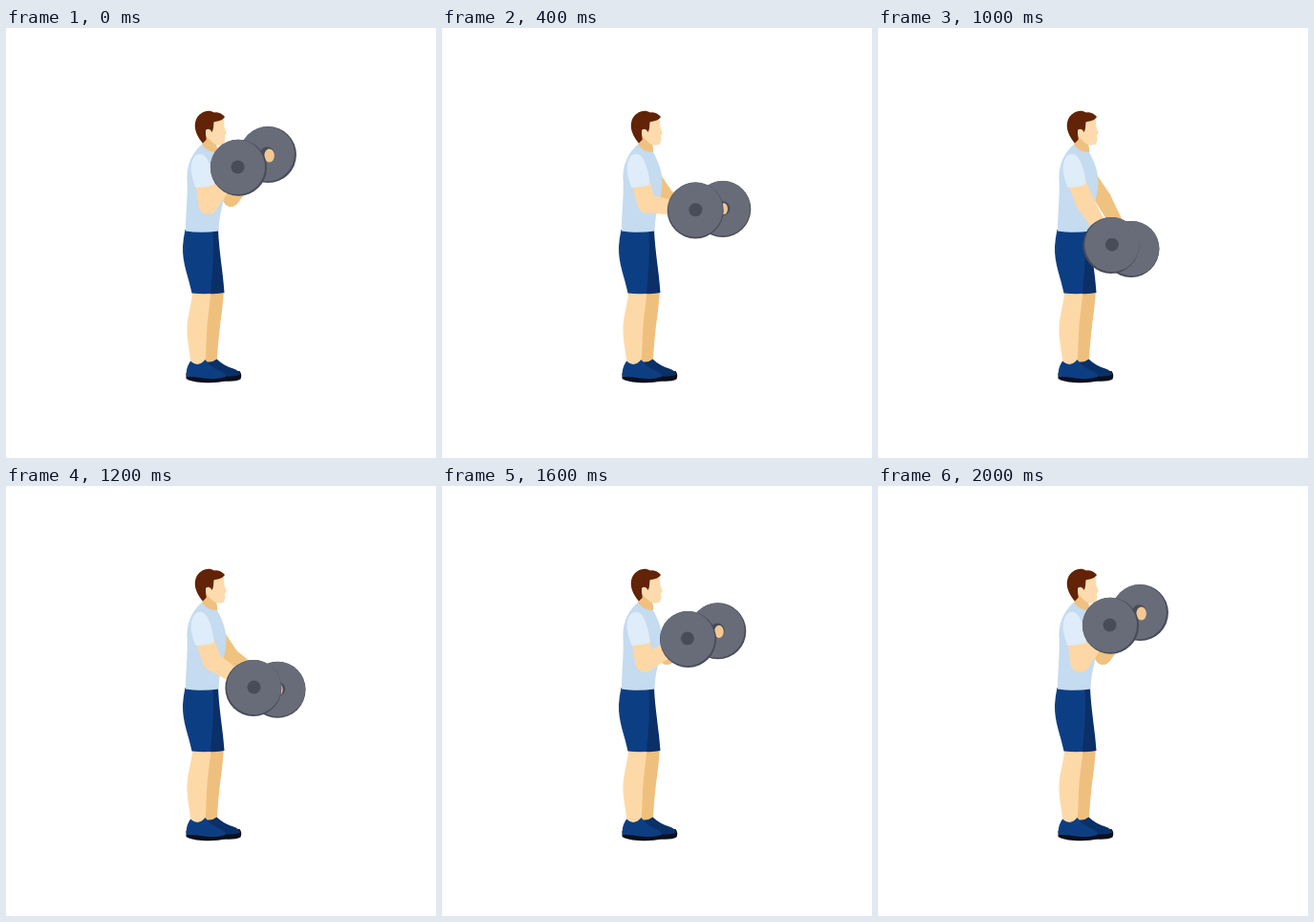
Write an HTML page that moves like this. It is 450 by 450 pixels and loops after 2.3 s.

```html
<!DOCTYPE html>
<html lang="en">
<head>
<meta charset="utf-8">
<title>Dumbbell curl</title>
<style>
  html, body { margin: 0; width: 100%; height: 100%; overflow: hidden; background: #fff; }
  svg { display: block; width: 100vw; height: 100vh; }
</style>
</head>
<body>
<svg viewBox="0 0 450 450">
  <path id="backUpper" fill="#f0c27f"/>
  <path id="backFore" fill="#f0c27f"/>

  <g id="legs">
    <path fill="#efc07d" d="M208 274 L227.800 274 C227 292 225 303 223.500 316 C222 329 221.500 340 220.500 351 L207 353 Z"/>
    <path fill="#fed9a8" d="M195.500 274 L214.500 274 C213.500 290 210.500 304 210 320 C209.500 333 209 343 208.500 353 L193.500 354 C193 340 189 328 189.500 313 C190 300 194.500 288 195.500 274 Z"/>
  </g>

  <g id="shoes">
    <path fill="#0c0f1c" d="M210 362 L244.500 359 Q247.500 363 245.500 367.500 Q240 370.500 228 369.500 L210 369 Z"/>
    <path fill="#0a3068" d="M208.500 349 Q215 351 220.500 346.500 Q228 353.500 238 356.500 Q245 359 245 363 Q236 366 225 364 L210 361 Z"/>
    <path fill="#0c0f1c" d="M188.500 361 L230 364 Q231.500 367 229.500 369.500 Q220 372 205 371 Q193 370 188.500 367 Z"/>
    <path fill="#0d3e82" d="M193 348.500 Q201 356 208.500 347 Q214 355 223 358.500 Q230 361 230 365 Q220 368.500 207 366.500 Q197 364.500 189 365 Q187.500 357 193 348.500 Z"/>
  </g>

  <g id="shorts">
    <path fill="#0a3067" d="M205 211 L222 211 C223 235 227 254 228.500 277 Q222 278.500 212 278 Z"/>
    <path fill="#0c3e84" d="M187.500 211 L216.500 211 C218 235 216 255 214 278 Q204 278.500 194.500 277.500 C191 260 184.500 247 185 229 Q185.500 220 187.500 211 Z"/>
  </g>

  <g id="head">
    <path fill="#efc180" d="M206 108 L219 116 L221 126 L221 133 L205 126 Z"/>
    <path fill="#fddbae" d="M210 98 L219 96 L228 96 L228.500 104 L230.800 110 L229 112.500 L229.500 117 L228 121.500 Q223 124 217.500 121 L209 113 Z"/>
    <path fill="#622306" d="M206 120.500 C200 114 196 105 198.500 97 C202 88 211 84.500 218 88.500 C223 87.500 226.500 90 229 93 C226 98 221 97 217.500 98.500 C217 102 217.500 106 215.500 109 C213 104 208.500 105 209 110 C209 114 210 115 209.500 117 Z"/>
    <path fill="#fddbae" d="M209 107 Q212 104.500 214.500 108.500 L214 114 Q209.500 113 209 107 Z"/>
  </g>

  <path id="shirt" fill="#c4dbf0" d="M205 122 Q212 131 221 130 C226 139 230 149 230.500 160 C230.500 178 223 190 222.500 212.500 Q204 215 188 212.500 C188 192 190.500 177 189.500 157 C189 142 196 129 205 122 Z"/>

  <path id="frontUpper" fill="#fdd7a5"/>
  <path id="frontFore" fill="#fdd7a5"/>
  <path id="sleeve" fill="#dfecf9" d="M198 133.500 Q205 129 210 136 C215 145 217 154 217.500 164 Q208 167.500 198.500 167 C194 156 190.500 142 198 133.500 Z"/>

  <g id="backDisc">
    <circle r="29.500" fill="#484b58"/>
    <g class="face">
      <circle r="28.600" fill="#686c78"/>
      <circle r="7.500" fill="#494c58"/>
      <ellipse id="hand" fill="#f3c894"/>
    </g>
  </g>
  <g id="frontDisc">
    <circle r="29.500" fill="#484b58"/>
    <g class="face">
      <circle r="28.600" fill="#686c78"/>
      <circle r="7" fill="#494c58"/>
    </g>
  </g>
</svg>
<script>
const LOOP = 2300, STEP = 100;
// Swing angle in degrees at each step, 0 = level, positive = down
const LOWER = [-56.6, -46, -33, -15, 4.7, 24, 43.8, 56, 68, 68];
const RAISE = [56, 44, 30, 15, 0, -17, -33, -41, -48, -53, -56.6, -56.6, -56.6];
const ANGLES = [...LOWER, ...RAISE];

const el = id => document.getElementById(id);
const rad = deg => deg * Math.PI / 180;
const polar = (x, y, r, deg) => [x + r * Math.cos(rad(deg)), y + r * Math.sin(rad(deg))];
const move = (node, x, y) =>
  node.setAttribute('transform', `translate(${x.toFixed(2)} ${y.toFixed(2)})`);

// Tapered limb with round ends
function limb(id, [x1, y1], r1, [x2, y2], r2) {
  const a = Math.atan2(y2 - y1, x2 - x1);
  const nx = -Math.sin(a), ny = Math.cos(a);
  const p = (x, y, r) => `${(x + nx * r).toFixed(2)} ${(y + ny * r).toFixed(2)}`;
  el(id).setAttribute('d',
    `M${p(x1, y1, r1)} L${p(x2, y2, r2)} A${r2} ${r2} 0 0 0 ${p(x2, y2, -r2)} ` +
    `L${p(x1, y1, -r1)} A${r1} ${r1} 0 0 0 ${p(x1, y1, r1)} Z`);
}

// The face sits off the rim's centre as the plate tilts
function placeDisc(id, [x, y], lean) {
  const disc = el(id);
  move(disc, x, y);
  move(disc.querySelector('.face'), 1.2 * lean, -0.8);
}

function draw(time) {
  const angle = ANGLES[Math.floor((time % LOOP) / STEP)];
  const front = polar(216.6, 187, 48.8, angle);
  const back = polar(233, 178.5, 61.8, angle * 0.95 + 5.8);
  const lean = Math.sin(rad(angle));
  const up = Math.max(0, -lean);

  const backElbow = [235.5, 178.5];
  const frontElbow = [214 + 3.2 * lean, 184 - 1.5 * lean];
  limb('backUpper', [224, 155], 5, backElbow, 8.5);
  limb('backFore', backElbow, 8.5, back, 5);
  limb('frontUpper', [207.5, 160], 9.5, frontElbow, 9.8);
  limb('frontFore', frontElbow, 9.8, front, 6);

  placeDisc('backDisc', back, lean);
  placeDisc('frontDisc', front, lean);

  const hand = el('hand');
  hand.setAttribute('cx', 1 + up * 1.5);
  hand.setAttribute('cy', 0.5 + up * 1.5);
  hand.setAttribute('rx', 4 + up * 1.5);
  hand.setAttribute('ry', 6 + up * 1.2);
}

const start = performance.now();
function tick() {
  draw(performance.now() - start);
  requestAnimationFrame(tick);
}
tick();
</script>
</body>
</html>
```
